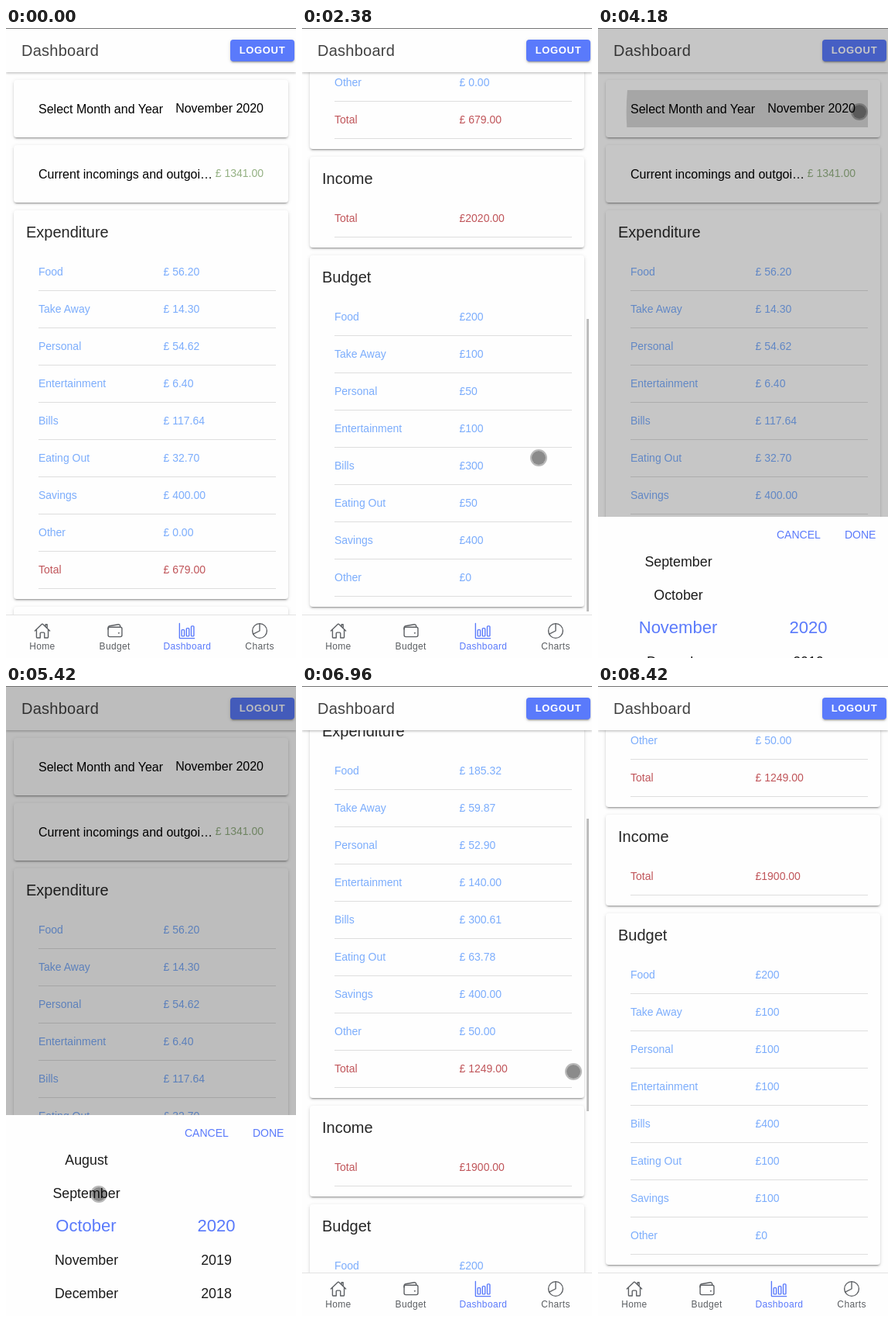
Animation of 375 by 812 pixels, one loop 8.96 s. Source, as an HTML page:

```html
<!DOCTYPE html>
<html lang="en">
<head>
<meta charset="utf-8">
<title>Dashboard</title>
<style>
  html, body { margin: 0; width: 100%; height: 100%; overflow: hidden; background: #fefefe; }
  body { position: relative; font: 14px "Liberation Sans", Arial, sans-serif; --blue: #5a7afb; }
  body > div, .abs { position: absolute; }

  #view { top: 57px; left: 0; width: 375px; height: 699px; overflow: hidden; }
  #content { position: absolute; width: 375px; }
  .card, #logout {
    box-shadow: 0 3px 1px -2px rgba(0,0,0,.2), 0 2px 2px rgba(0,0,0,.14), 0 1px 5px rgba(0,0,0,.12);
    border-radius: 4px;
  }
  .card { margin: 10px 10px 0; background: #fefefe; }
  .line { display: flex; height: 74px; padding: 0 32px; font-size: 16px; color: #000; white-space: nowrap; }
  .line span { flex: 1; min-width: 0; line-height: 76px; overflow: hidden; text-overflow: ellipsis; }
  .line b { font-weight: 400; line-height: 73px; }
  .line .net { font-size: 14px; color: #94b183; }
  .table { padding-bottom: 13px; }
  h2 { margin: 0 16px; font-size: 20px; font-weight: 400; line-height: 56px; color: #262626; }
  .row { display: flex; margin: 0 16px 0 32px; height: 47px; line-height: 47px; border-bottom: 1px solid #dedede; color: #7cadfc; }
  .row span { width: 161.5px; }
  .row.total { color: #c0555a; }
  #rippleBox { top: 23px; left: 26px; width: 323px; height: 48px; overflow: hidden; }
  #ripple { left: -43px; top: -327px; width: 710px; height: 710px; border-radius: 50%; background: #000; }
  #bar { left: 368px; width: 3px; height: 377px; background: #bdbdbd; }

  #header { top: 0; left: 0; width: 375px; height: 57px; background: #fefefe; box-shadow: 0 1px 3px rgba(0,0,0,.3); }
  #title { left: 20px; line-height: 58px; font-size: 20px; letter-spacing: .25px; color: #424242; }
  #logout {
    left: 290px; top: 15px; width: 83px; height: 28px; line-height: 27px; background: var(--blue); color: #fff;
    font-size: 13px; font-weight: 700; letter-spacing: .05em; text-align: center;
  }
  #tabs { top: 756px; left: 0; width: 375px; height: 55px; display: flex; background: #fefefe; border-top: 1px solid #e2e2e2; }
  .tab { flex: 1; text-align: center; font-size: 12px; letter-spacing: .03em; line-height: 14px; color: #5c5f63; }
  .tab.on { color: var(--blue); }
  .tab svg { display: block; margin: 9px auto 2px; width: 22px; height: 22px; fill: none; stroke: currentColor; stroke-width: 32; stroke-linecap: round; stroke-linejoin: round; }

  #shade { inset: 0; background: #000; }
  #topline { top: 0; left: 0; width: 375px; height: 1px; background: #747474; }
  #sheet { top: 553px; left: 0; width: 375px; height: 259px; background: #fefefe; color: var(--blue); }
  #sheet .action { top: 15px; line-height: 16px; }
  #wheels { top: 38px; left: 0; width: 375px; height: 221px; overflow: hidden; }
  .option { width: 160px; height: 43px; line-height: 43px; font-size: 22px; text-align: center; transform-origin: 50% 62%; }
  #cursor {
    left: -11px; top: -11px; width: 18px; height: 18px; border: 2px solid rgba(0,0,0,.27); border-radius: 50%;
    background: rgba(0,0,0,.45); background-clip: padding-box;
  }
</style>
</head>
<body>
<div id="view">
  <div id="content">
    <div id="cards"></div>
    <div id="rippleBox" class="abs"><div id="ripple" class="abs"></div></div>
  </div>
  <div id="bar" class="abs"></div>
</div>
<div id="header"><div id="title" class="abs">Dashboard</div><div id="logout" class="abs">LOGOUT</div></div>
<div id="tabs"></div>
<div id="shade"></div>
<div id="topline"></div>
<div id="sheet">
  <div class="abs action" style="left:231px">CANCEL</div>
  <div class="abs action" style="left:319px">DONE</div>
  <div id="wheels" class="abs"></div>
</div>
<div id="cursor"></div>
<script>
const $ = id => document.getElementById(id);
const LOOP = 8960;
const CATEGORIES = ['Food', 'Take Away', 'Personal', 'Entertainment', 'Bills', 'Eating Out', 'Savings', 'Other'];
const MONTHS = ['July', 'August', 'September', 'October', 'November', 'December'];
const REPORTS = {
  November: { income: 2020, spent: '56.20 14.30 54.62 6.40 117.64 32.70 400.00 0.00', budget: '200 100 50 100 300 50 400 0' },
  October: { income: 1900, spent: '185.32 59.87 52.90 140.00 300.61 63.78 400.00 50.00', budget: '200 100 100 100 400 100 100 0' }
};
const ICONS = {
  Home: '<path d="M80 212v236a16 16 0 0016 16h96V328a24 24 0 0124-24h80a24 24 0 0124 24v136h96a16 16 0 0016-16V212M480 256L267 52c-5-5-17-5-22 0L32 256M400 179V64h-48v69"/>',
  Budget: '<rect x="48" y="144" width="416" height="288" rx="48"/><path d="M411 144v-30a50 50 0 00-59-49L89 110a50 50 0 00-41 49v49"/><circle cx="368" cy="320" r="8"/>',
  Dashboard: '<path d="M32 32v432a16 16 0 0016 16h432"/><rect x="96" y="224" width="80" height="192" rx="20"/><rect x="240" y="176" width="80" height="240" rx="20"/><rect x="384" y="112" width="80" height="304" rx="20"/>',
  Charts: '<circle cx="256" cy="256" r="218"/><path d="M256 38v218L62 352"/>'
};

// Every flick scrolls the same distance, up or down, until the page ends.
const FLICK = 490, FLICK_TIME = 500, MAX_SCROLL = 580;
const FLICKS = [[1025, 1], [1890, 1], [2510, -1], [3150, -1], [6842, 1], [7710, 1]];
// Pointer moves: [start, x, y]
const MOVES = [
  [600, 318, 534], [1920, 306, 554], [3500, 338, 108], [4380, 118, 612],
  [4990, 120, 655], [5440, 347, 572], [6080, 351, 497]
];
const TAP = 3990, OPEN = 4076, DRAG = 4990, CLOSE = 5930;

const clamp = (x, max = 1) => Math.min(max, Math.max(0, x));
const easeOut = (x, power) => 1 - (1 - clamp(x)) ** power;
const glide = (t, start) => {
  const x = clamp((t - start) / 400);
  return x * x * (3 - 2 * x);
};
const slide = (t, start) => easeOut((t - start) / 400, 4);

const scrollAt = t => FLICKS.reduce((y, [start, direction]) =>
  clamp(y + direction * FLICK * easeOut((t - start) / FLICK_TIME, 2), MAX_SCROLL), 0);

function barOpacity(t) {
  const idle = Math.min(...FLICKS.map(([start]) => t < start ? Infinity : t - start));
  return clamp((700 - idle) / 200);
}

const pointerAt = t => MOVES.reduce(([x, y], [start, toX, toY]) => {
  const k = glide(t, start);
  return [x + (toX - x) * k, y + (toY - y) * k];
}, [340, 580]);

const row = (name, value, kind = '') => `<div class="row ${kind}"><span>${name}</span>${value}</div>`;
const table = (title, rows) => `<div class="card table"><h2>${title}</h2>${rows}</div>`;
const rowsOf = (values, sign) => values.split(' ').map((value, i) => row(CATEGORIES[i], sign + value)).join('');

let shownMonth;
function showMonth(month) {
  if (month === shownMonth) return;
  shownMonth = month;
  const { income, spent, budget } = REPORTS[month];
  const total = spent.split(' ').reduce((sum, value) => sum + parseInt(value), 0);
  $('cards').innerHTML =
    `<div class="card line"><span>Select Month and Year</span><b>${month} 2020</b></div>` +
    `<div class="card line"><span>Current incomings and outgoings</span><b class="net">£ ${income - total}.00</b></div>` +
    table('Expenditure', rowsOf(spent, '£ ') + row('Total', `£ ${total}.00`, 'total')) +
    table('Income', row('Total', `£${income}.00`, 'total')) +
    table('Budget', rowsOf(budget, '£'));
}

function makeWheel(labels, center) {
  return labels.map(label => {
    const option = document.createElement('div');
    option.className = 'abs option';
    option.style.left = center - 80 + 'px';
    option.textContent = label;
    $('wheels').append(option);
    return option;
  });
}

function turnWheel(options, position) {
  options.forEach((option, i) => {
    const selected = i === Math.round(position);
    option.style.transform = `translateY(${83 + 43 * (i - position)}px) scale(${selected ? 1 : .81})`;
    option.style.color = selected ? 'var(--blue)' : '#1c1c1c';
  });
}

$('tabs').innerHTML = Object.entries(ICONS).map(([name, shapes]) =>
  `<div class="tab ${name === 'Dashboard' ? 'on' : ''}"><svg viewBox="0 0 512 512">${shapes}</svg>${name}</div>`).join('');
const monthWheel = makeWheel(MONTHS, 103.5);
const yearWheel = makeWheel(['2020', '2019', '2018'], 272);
turnWheel(yearWheel, 0);

function render(t) {
  showMonth(t > CLOSE + 70 ? 'October' : 'November');

  const scroll = Math.round(scrollAt(t));
  $('content').style.top = -scroll + 'px';
  $('bar').style.top = 3 + scroll * .5425 + 'px';
  $('bar').style.opacity = barOpacity(t);

  $('ripple').style.transform = `scale(${clamp((t - TAP) / 225)})`;
  $('ripple').style.opacity = .16 * clamp((TAP + 410 - t) / 150);

  const open = slide(t, OPEN) - slide(t, CLOSE);
  $('shade').style.opacity = .26 * Math.sqrt(open);
  $('sheet').style.transform = `translateY(${Math.round(259 * (1 - open))}px)`;
  turnWheel(monthWheel, MONTHS.indexOf('November') - glide(t, DRAG));

  const [x, y] = pointerAt(t);
  $('cursor').style.visibility = t >= 600 && t < 8400 ? 'visible' : 'hidden';
  $('cursor').style.transform = `translate(${x}px, ${y}px)`;
}

const origin = performance.now();
function tick() {
  render((performance.now() - origin) % LOOP);
  requestAnimationFrame(tick);
}
tick();
</script>
</body>
</html>
```
